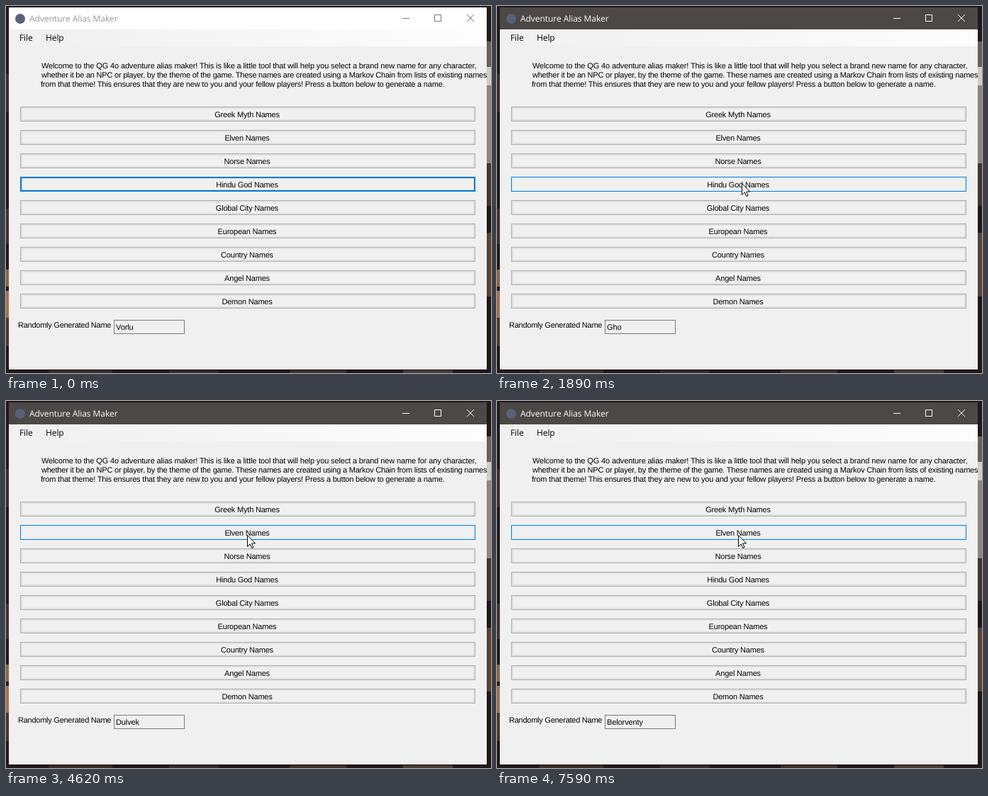
Write an HTML page that moves like this. It is 684 by 518 pixels and loops after 8000 ms.

```html
<!DOCTYPE html>
<html lang="en">
<head>
<meta charset="utf-8">
<title>Adventure Alias Maker</title>
<style>
html, body { margin: 0; width: 100%; height: 100%; overflow: hidden; background: #21181a; }
svg { display: block; width: 684px; height: 518px; }
text { font: 11px "Liberation Sans", Arial, sans-serif; text-rendering: geometricPrecision; white-space: pre; }
.ui { font: 12px "Open Sans", "Noto Sans", sans-serif; }
rect { shape-rendering: crispEdges; }
</style>
</head>
<body>
<svg id="stage" viewBox="0 0 684 518"></svg>
<script>
const LOOP = 8000, ACTIVE_AT = 1030;
const LABELS = ['Greek Myth', 'Elven', 'Norse', 'Hindu God', 'Global City',
  'European', 'Country', 'Angel', 'Demon'].map(s => s + ' Names');
const NAMES = ['Vorlu', 'Orvesh', 'Gho', 'Tuvash', 'Oorenna', 'Dulvek', 'Ilun', 'Nelyth', 'Belorventy'];
const CLICKS = [[1030, 1110], [1810, 1890], [2600, 2670], [3380, 3530],
  [4540, 4620], [5630, 5720], [6580, 6660], [7500, 7590]];
const ELVEN = 1, HINDU = 3, ELVEN_CLICK = 4540;

const stage = document.getElementById('stage');

function add(tag, attrs, parent = stage) {
  const el = document.createElementNS('http://www.w3.org/2000/svg', tag);
  for (const k in attrs) el.setAttribute(k, attrs[k]);
  return parent.appendChild(el);
}
const set = (el, attrs) => { for (const k in attrs) el.setAttribute(k, attrs[k]); };
const rect = (x, y, width, height, fill) => add('rect', { x, y, width, height, fill });
function label(str, x, y, attrs = {}) {
  const el = add('text', { x, y, fill: '#000', ...attrs });
  el.textContent = str;
  return el;
}

// Desktop showing around the window
rect(0, 0, 684, 518, '#21181a');
[[0, 96, 4, 54, '#3a2c2b'], [0, 286, 4, 50, '#40302a'], [0, 372, 4, 24, '#8d6547'],
 [0, 402, 4, 38, '#a3724c'], [0, 440, 4, 40, '#4c3428'],
 [678, 50, 6, 36, '#6a5f5d'], [678, 86, 6, 26, '#d3cbc7'], [678, 112, 6, 110, '#8f8481'],
 [678, 222, 6, 60, '#43352f'], [678, 320, 6, 90, '#5a4234'],
 [60, 514, 90, 4, '#3a2a28'], [230, 514, 70, 4, '#33292a'],
 [400, 514, 80, 4, '#402d2a'], [560, 514, 70, 4, '#4a3a35']
].forEach(a => rect(...a));

// Window frame, title bar and menu
rect(4, 2, 674, 511, '#f0f0f0');
const bar = rect(4, 2, 674, 31, '#fff');
const grad = add('linearGradient', { id: 'menu' }, add('defs', {}));
add('stop', { offset: 0, 'stop-color': '#f0f0f0' }, grad);
add('stop', { offset: 1, 'stop-color': '#fdfdfd' }, grad);
rect(4, 33, 674, 24, 'url(#menu)');
add('circle', { cx: 20, cy: 18, r: 7, fill: '#59617a' });
const title = label('Adventure Alias Maker', 33, 22, { class: 'ui', 'letter-spacing': -0.05 });
const controls = add('path', {
  d: 'M559 17.5h10M604.5 12.5h9v9h-9zM650 12l10 10M660 12l-10 10', fill: 'none'
});
label('File', 19, 49, { class: 'ui', 'letter-spacing': -0.1 });
label('Help', 56, 49, { class: 'ui', 'letter-spacing': -0.1 });

// Introduction
[['Welcome to the QG 4o adventure alias maker! This is like a little tool that will help you select a brand new name for any character,', 50, -0.135],
 ['whether it be an NPC or player, by the theme of the game. These names are created using a Markov Chain from lists of existing names', 50, -0.22],
 ['from that theme! This ensures that they are new to you and your fellow players! Press a button below to generate a name.', 49, -0.19]
].forEach(([s, x, gap], i) => label(s, x, 88 + 13 * i, { 'letter-spacing': gap }));

// Buttons: border, inner ring, face, caption
const rowY = i => 142 + 33 * i;
const buttons = LABELS.map((s, i) => {
  const y = rowY(i);
  const edge = rect(20, y, 642, 21), ring = rect(21, y + 1, 640, 19);
  rect(23, y + 3, 636, 15, '#f0f0f0');
  label(s, 340, y + 15, { 'text-anchor': 'middle', 'letter-spacing': -0.2 });
  return { edge, ring };
});

function paintButton({ edge, ring }, i, state) {
  const [line, inner, w] = {
    normal: ['#adadad', '#e1e1e1', 1],
    focus: ['#0078d7', '#e1e1e1', 2],
    hover: ['#0078d7', '#e5f1fb', 1],
    down: ['#005499', '#cce4f7', 1]
  }[state];
  edge.setAttribute('fill', line);
  set(ring, { fill: inner, x: 20 + w, y: rowY(i) + w, width: 642 - 2 * w, height: 21 - 2 * w });
}

// Result field
label('Randomly Generated Name', 17, 454, { 'letter-spacing': -0.25 });
rect(152, 443, 100, 20, '#7a7a7a');
rect(153, 444, 98, 18, '#f0f0f0');
const result = label('', 155, 457, { 'letter-spacing': -0.1 });

// Pointer
const glow = add('circle', { r: 15, fill: '#ff0', 'fill-opacity': 0.55 });
const pointer = add('path', {
  d: 'M.5 .5V16.5L4.2 12.9 6.7 18.5 9 17.5 6.5 12H11.5Z', fill: '#fff', stroke: '#000'
});

// Eased progress of a move that advances in n even steps
function stepped(t, from, to, n) {
  const step = Math.min(n, Math.floor((t - from + 5) / ((to - from) / (n - 1))) + 1);
  return 1 - (1 - step / n) ** 2;
}

function pointerAt(t) {
  if (t < 70) return null;
  if (t < 810) {
    const e = stepped(t, 70, 560, 7);
    return [Math.round(352 - 7 * e), Math.round(592 - 344 * e)];
  }
  if (t < 3840) return [345, 250];
  const e = stepped(t, 3840, 4390, 8);
  return [Math.round(345 - 5 * Math.min(1, 2.3 * e)), Math.round(250 - 61 * e)];
}

function draw(t) {
  const active = t >= ACTIVE_AT;
  bar.setAttribute('fill', active ? '#4b4845' : '#fff');
  title.setAttribute('fill', active ? '#fff' : '#999');
  controls.setAttribute('stroke', active ? '#fff' : '#777');

  const pos = pointerAt(t);
  const down = CLICKS.some(([a, b]) => t >= a && t < b);
  const focus = t < ELVEN_CLICK ? HINDU : ELVEN;
  buttons.forEach((b, i) => {
    const over = pos && pos[1] >= rowY(i) && pos[1] < rowY(i) + 21;
    paintButton(b, i, over ? (down ? 'down' : 'hover') : i === focus ? 'focus' : 'normal');
  });

  result.textContent = NAMES[CLICKS.filter(c => t >= c[1]).length];
  const [x, y] = pos || [0, 0];
  set(pointer, { transform: `translate(${x} ${y})`, visibility: pos ? 'visible' : 'hidden' });
  set(glow, { cx: x, cy: y, visibility: down ? 'visible' : 'hidden' });
}

const start = performance.now();
function tick() {
  draw((performance.now() - start) % LOOP);
  requestAnimationFrame(tick);
}
tick();
</script>
</body>
</html>
```
